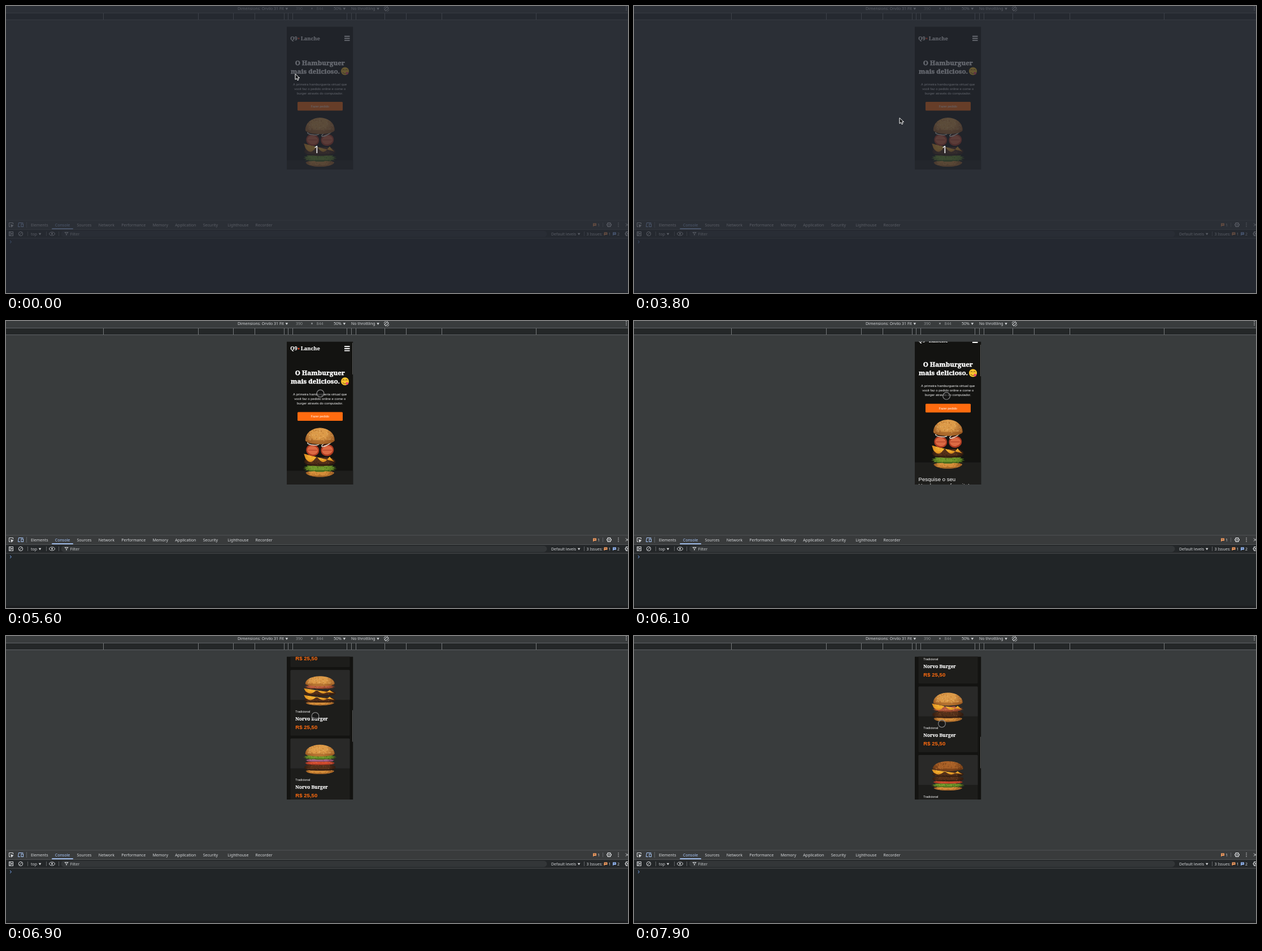
Write an HTML page with a canvas that moves like this. It is 1101 px wide and 509 px high and loops after 8000 ms.

```html
<!DOCTYPE html>
<html lang="pt">
<head>
<meta charset="utf-8">
<style>
html, body { margin: 0; width: 100%; height: 100%; overflow: hidden; background: #393c3d; }
canvas { display: block; }
</style>
</head>
<body>
<canvas id="stage" width="1101" height="509"></canvas>
<script>
const ctx = document.getElementById('stage').getContext('2d');
const LOOP = 8000, STEP = 100, COUNTDOWN_END = 4100, TOUCH_START = 5300;
const PHONE = { x: 497, y: 36.5, w: 117.5, h: 253.5, content: 1152 };
const CENTER = PHONE.x + PHONE.w / 2;
const UI = '"Noto Sans", sans-serif';
const SANS = '"Liberation Sans", Arial, sans-serif';
const SERIF = '"Noto Serif", serif';
const ORANGE = '#ff6b0f', BLUE = '#a8c7fa', GREY = '#d5d7da', LINE = '#5f6265';

// Pointer moves and the scroll offset they lead to
const START = { x: 512, y: 120.5, scroll: 0 };
const MOVES = [
  { from: 0, to: 200, x: 518, y: 125 },
  { from: 200, to: 800, x: 543, y: 97.5 },
  { from: 3100, to: 3600, x: 701, y: 175 },
  { from: 3600, to: 4000, x: 239, y: 222 },
  { from: 4000, to: 4400, x: 491.5, y: 189 },
  { from: 4400, to: 5000, x: 614.5, y: 182 },
  { from: 5200, to: 5600, x: 556.5, y: 128.5, scroll: 8.5 },
  { from: 5600, to: 6400, x: 551.5, y: 135, scroll: 30 },
  { from: 6400, to: 6900, x: 547.5, y: 142, scroll: 430 },
  { from: 7000, to: 7300, x: 546, y: 148, scroll: 537 },
  { from: 7600, to: 7900, x: 545, y: 155.5, scroll: 644 }
];

function poseAt(t) {
  let pose = START;
  for (const move of MOVES) {
    const p = Math.min(1, Math.max(0, (t - move.from) / (move.to - move.from)));
    const eased = p * p * (3 - 2 * p);
    const mix = key => pose[key] + ((move[key] ?? pose[key]) - pose[key]) * eased;
    pose = { x: mix('x'), y: mix('y'), scroll: mix('scroll') };
  }
  return pose;
}

function rect(x, y, w, h, color, radius = 0) {
  ctx.fillStyle = color;
  ctx.beginPath();
  ctx.roundRect(x, y, w, h, radius);
  ctx.fill();
}

function path(points, color, { fill = false, close = false, width = 1 } = {}) {
  ctx.beginPath();
  points.forEach(([x, y]) => ctx.lineTo(x, y));
  if (close) ctx.closePath();
  ctx.fillStyle = ctx.strokeStyle = color;
  ctx.lineWidth = width;
  fill ? ctx.fill() : ctx.stroke();
}

function ellipse(x, y, rx, ry, color, { width = 0, angle = 0, from = 0, to = Math.PI * 2 } = {}) {
  ctx.beginPath();
  ctx.ellipse(x, y, rx, ry, angle, from, to);
  ctx.fillStyle = ctx.strokeStyle = color;
  ctx.lineWidth = width;
  width ? ctx.stroke() : ctx.fill();
}

// y is the middle of the capital letters; returns the right end of left-aligned text
function text(str, x, y, size = 7, color = GREY, { family = UI, weight = 400, align = 'left', bolder = 0 } = {}) {
  ctx.font = `${weight} ${size}px ${family}`;
  ctx.textAlign = align;
  ctx.fillStyle = ctx.strokeStyle = color;
  ctx.fillText(str, x, y + size * 0.36);
  ctx.lineWidth = bolder;
  if (bolder) ctx.strokeText(str, x, y + size * 0.36);
  return x + ctx.measureText(str).width;
}

function random(seed) {
  return () => (seed = (seed * 16807) % 2147483647) / 2147483647;
}

const vline = (x, y, h, color = LINE) => rect(x, y, 1, h, color);
const dots = (x, y) => [-3, 0, 3].forEach(d => ellipse(x, y + d, 0.8, 0.8, GREY));
const dropdown = (label, x, y) => {
  const end = text(label, x, y) + 5;
  path([[end - 2.3, y - 1.2], [end + 2.3, y - 1.2], [end, y + 2.5]], GREY, { fill: true });
};

function gear(x, y) {
  ellipse(x, y, 3.3, 3.3, GREY, { width: 1.2 });
  ellipse(x, y, 1.2, 1.2, GREY);
  for (let a = 0; a < Math.PI * 2; a += Math.PI / 3) {
    const c = Math.cos(a), s = Math.sin(a);
    path([[x + c * 3, y + s * 3], [x + c * 4.5, y + s * 4.5]], GREY, { width: 1.5 });
  }
}

function badge(x, y, color, count) {
  rect(x - 3, y - 2.7, 6, 4.5, color, 0.6);
  path([[x - 3, y], [x - 3, y + 3.4], [x, y + 1]], color, { fill: true });
  rect(x - 1.5, y - 1.2, 3, 0.8, '#2a2d2f');
  text(count, x + 5, y);
}

const FOOD = {
  bun: { height: 20, width: 52, light: '#dc9a48', dark: '#91501d', speck: '#efcb8b' },
  darkBun: { height: 20, width: 54, light: '#a75f26', dark: '#542a10', speck: '#cc8640' },
  heel: { height: 9, width: 50, light: '#d48d39', dark: '#7d4317', speck: '#e0a557' },
  patty: { height: 11, width: 57, light: '#553019', dark: '#1d110c', speck: '#7d5233' },
  cheese: { height: 5, width: 57, light: '#f2ae2e', dark: '#d17c18', speck: '#ffc850' },
  lettuce: { height: 9, width: 61, light: '#6f962b', dark: '#24400f', speck: '#9cbc46' },
  tomato: { height: 6, width: 53, light: '#d24c2e', dark: '#85281a', speck: '#e98760' },
  onion: { height: 5, width: 51, light: '#a9688a', dark: '#592744', speck: '#dfc0cf' },
  bacon: { height: 9, width: 56, light: '#bd5f40', dark: '#54210f', speck: '#e2a070' },
  slices: { height: 13 },
  rings: { height: 5 }
};

function slices(cx, y, h) {
  for (const side of [-1, 1]) {
    const x = cx + side * 13, angle = -side * 0.2;
    ellipse(x, y + h / 2, 11.5, h * 0.55, '#ad3a22', { angle });
    ellipse(x, y + h / 2, 9.5, h * 0.4, '#dc6a44', { angle });
    path([[x - 8, y + h / 2], [x + 8, y + h / 2]], '#ad3a22');
  }
}

function rings(cx, y, h) {
  for (const side of [-1, 1]) {
    ellipse(cx + side * 12, y + h / 2, 10, 2.8, '#dcd7c8', { width: 1.5, angle: 0.1 - (side > 0) * 0.6 });
  }
}

function outline(kind, cx, y, w, h) {
  ctx.beginPath();
  if (/bun|heel/i.test(kind)) {
    const crown = kind === 'heel' ? 0.3 : 0.75;
    ctx.ellipse(cx, y + h * crown, w / 2, h * crown, 0, Math.PI, Math.PI * 2);
    ctx.ellipse(cx, y + h * crown, w / 2, h * (1 - crown), 0, 0, Math.PI);
  } else if (kind === 'cheese') {
    ctx.moveTo(cx - w / 2, y);
    for (let f = 1; f >= 0; f -= 0.05) {
      ctx.lineTo(cx + (f - 0.5) * w, y + h * (0.35 + 0.65 * Math.abs(Math.sin(f * Math.PI * 2.5))));
    }
  } else {
    const ruffle = /lettuce|bacon/.test(kind) ? 0.11 : 0.03;
    for (let a = 0; a < Math.PI * 2; a += 0.15) {
      const r = 1 - ruffle + ruffle * Math.sin(a * 13), c = Math.cos(a), s = Math.sin(a);
      ctx.lineTo(cx + Math.sign(c) * Math.abs(c) ** 0.6 * r * w / 2, y + h / 2 + s * r * h / 2);
    }
  }
}

function layer(kind, cx, y, h) {
  if (kind === 'slices') return slices(cx, y, h);
  if (kind === 'rings') return rings(cx, y, h);
  const { width: w, light, dark, speck } = FOOD[kind];
  const rand = random(w * 97 + kind.length);
  ctx.save();
  outline(kind, cx, y, w, h);
  const shade = ctx.createRadialGradient(cx - 3, y + h * 0.2, 2, cx, y + h * 0.3, w * 0.6);
  shade.addColorStop(0, light);
  shade.addColorStop(0.4, light);
  shade.addColorStop(1, dark);
  ctx.fillStyle = shade;
  ctx.fill();
  ctx.clip();
  ctx.globalAlpha = 0.5;
  rect(cx - w / 2, y + h * 0.75, w, h, dark);
  for (let i = 0; i < w * h / 16; i++) {
    ellipse(cx + (rand() - 0.5) * w, y + rand() * h * 0.8, 1.1, 0.6, i % 2 ? speck : dark, { angle: rand() * 3 });
  }
  ctx.restore();
}

// Stacks the ingredients, listed from the top, into the given height
function burger(recipe, cx, top, height) {
  const kinds = recipe.split(' ');
  const scale = height / kinds.reduce((sum, kind) => sum + FOOD[kind].height, 0);
  let y = top + height;
  for (const kind of kinds.reverse()) {
    const h = FOOD[kind].height * scale;
    y -= h;
    const overhang = kind === 'cheese' ? 2.4 : kind === 'heel' ? 1 : 1.2;
    layer(kind, cx, y, h * overhang);
  }
}

const HERO = 'bun rings slices cheese patty lettuce heel';
const RECIPES = [
  'bun cheese lettuce patty heel',
  'bun bacon cheese patty cheese patty heel',
  'bun lettuce onion tomato patty heel',
  'bun cheese bacon patty heel',
  'darkBun cheese patty patty tomato lettuce heel'
];

function emoji(x, y) {
  const brown = '#65471b';
  ellipse(x, y, 7, 7, '#fcc42d');
  for (const side of [-1, 1]) {
    ellipse(x + side * 2.6, y - 1.6, 1.5, 1.3, brown, { width: 1, from: Math.PI, to: Math.PI * 2 });
  }
  ellipse(x, y + 1, 4, 3.4, brown, { width: 1, from: 0.2, to: 2.9 });
  ellipse(x + 3.7, y + 3.6, 2.1, 2.5, '#ef4a68', { angle: -0.7 });
}

function card(y, recipe) {
  rect(503.5, y, 105, 116.5, '#1d1d1b', 1.5);
  rect(503.5, y, 105, 53, '#292928', [1.5, 1.5, 0, 0]);
  burger(recipe, CENTER, y + 11, 52);
  text('Tradicional', 512.3, y + 73.7, 5.4, '#fff', { family: SANS });
  text('Norvo Burger', 512.3, y + 86.5, 8.3, '#fff', { family: SERIF, weight: 700, bolder: 0.2 });
  text('R$ 25,50', 512.3, y + 101, 9.6, ORANGE, { family: SANS, weight: 700 });
}

function phone(scroll, showBar) {
  const { x, y, w, h, content } = PHONE;
  const centered = { family: SANS, align: 'center' };
  ctx.save();
  ctx.beginPath();
  ctx.rect(x, y, w, h);
  ctx.clip();
  rect(x, y, w, h, '#131311');
  ctx.translate(0, -scroll);
  rect(x, 274, w, 83, '#1e1e1c');

  const logo = { family: SERIF, weight: 700, bolder: 0.15 };
  text('Q9', 503.3, 57.5, 9.2, '#fff', logo);
  ellipse(518, 57.5, 1.6, 1.6, '#f0441e');
  text('Lanche', 521.8, 57.5, 9.2, '#fff', logo);
  for (let i = 0; i < 3; i++) rect(599, 52.8 + i * 3.7, 9.5, 1.9, '#fff');

  const title = { family: SERIF, weight: 900, align: 'center', bolder: 0.45 };
  text('O Hamburguer', CENTER, 100.5, 11.6, '#fff', title);
  text('mais delicioso.', 547.5, 115.5, 11.6, '#fff', title);
  emoji(600, 115.5);
  ['A primeira hamburgueria virtual que', 'você faz o pedido online e come o', 'burger através do computador.']
    .forEach((line, i) => text(line, CENTER, 138.5 + i * 8, 6, '#f5f5f5', centered));
  rect(516, 170, 80, 15.5, ORANGE, 1.5);
  text('Fazer pedido', CENTER, 177.8, 5.5, '#fff', centered);
  burger(HERO, CENTER, 198, 87);

  ['Pesquise o seu', 'Hamburguer favorito!']
    .forEach((line, i) => text(line, 503.5, 303.5 + i * 11.5, 9.6, '#fff', { family: SANS }));
  rect(503.5, 328, 105, 18, '#292928', 1.5);
  for (let i = 0; i < 7; i++) card(368.6 + i * 121.6, RECIPES[i % RECIPES.length]);
  ctx.restore();
  if (showBar) rect(613, y + 0.5 + scroll * h / content, 1, h * h / content, '#585858');
}

function deviceBar() {
  rect(0, 0, 1101, 380, '#393c3d');
  rect(0, 12, 1101, 13, LINE);
  rect(0, 13, 1101, 11, '#242728');
  // Ruler marks at the edges of common device widths
  for (const width of [320, 375, 425, 768, 1024, 1440, 2560]) {
    for (const side of [-1, 1]) vline(Math.round(555.3 + side * width * 0.1496), 13, 11, '#777a7c');
  }
  dropdown('Dimensions: Orvilo 31 Fit', 410, 4.5);
  text('390', 513, 4.5, 7, '#8f9294');
  text('×', 539.5, 4.5);
  text('844', 549.5, 4.5, 7, '#8f9294');
  dropdown('50%', 580, 4.5);
  dropdown('No throttling', 611, 4.5);
  ctx.save();
  ctx.translate(673.5, 5);
  ctx.rotate(Math.PI / 4);
  ctx.strokeStyle = GREY;
  ctx.lineWidth = 1;
  ctx.strokeRect(-1.7, -3.5, 3.4, 7);
  for (const from of [-0.6, Math.PI - 0.6]) ellipse(0, 0, 4.6, 4.6, GREY, { width: 0.8, from, to: from + 1.2 });
  ctx.restore();
  dots(1098, 4);
}

function box(x, y, w, h, color) {
  ctx.strokeStyle = color;
  ctx.lineWidth = 1;
  ctx.strokeRect(x, y, w, h);
}

function devTools() {
  rect(0, 380, 1101, 16, '#393b3c');
  rect(0, 396, 1101, 16, '#242729');
  rect(0, 412, 1101, 93, '#212527');
  rect(0, 505, 1101, 4, '#1b1d1f');
  for (const y of [379.5, 396, 411.5]) rect(0, y, 1101, 1, '#505355');

  path([[8, 391.5], [5.5, 391.5], [5.5, 384.5], [12.5, 384.5], [12.5, 387]], GREY);
  path([[8, 387], [13.5, 389], [9.5, 393]], GREY, { fill: true });
  path([[25, 391.5], [21.5, 391.5], [22.5, 384.5], [30.5, 384.5]], BLUE);
  box(27, 386.5, 3.5, 5, BLUE);
  vline(36, 383, 10);
  let x = 44;
  for (const name of 'Elements Console Sources Network Performance Memory Application Security Lighthouse Recorder'.split(' ')) {
    const active = name === 'Console';
    if (name === 'Lighthouse') x += 5;
    const end = text(name, x, 388, 7.05, active ? BLUE : GREY);
    if (active) rect(x - 5.5, 394.3, end - x + 11, 1.7, BLUE);
    x = end + 12.2;
  }
  badge(1042, 388, '#f29b5f', '1');
  vline(1056, 384, 8);
  gear(1067.5, 388);
  dots(1084, 388);
  for (const side of [-1, 1]) path([[1097, 388 - side * 2.5], [1102, 388 + side * 2.5]], GREY);

  box(5.5, 400.5, 7, 7, GREY);
  vline(7, 400, 8, GREY);
  path([[9, 402], [12, 404], [9, 406]], GREY, { fill: true });
  ellipse(26, 404, 3.7, 3.7, GREY, { width: 1 });
  path([[23.5, 406.5], [28.5, 401.5]], GREY);
  for (const lineX of [38, 71, 93, 1023]) vline(lineX, 400, 8);
  dropdown('top', 44, 404);
  ellipse(81.5, 404, 4.8, 3, GREY, { width: 1 });
  ellipse(81.5, 404, 1.4, 1.4, GREY);
  rect(97.5, 398.7, 860, 11, '#333638', 5.5);
  path([[104, 401.5], [110, 401.5], [107, 404.8]], GREY, { close: true });
  vline(106.5, 404, 3, GREY);
  text('Filter', 113.5, 404, 7, '#c0c3c5');
  dropdown('Default levels', 965, 404);
  text('3 Issues:', 1027.5, 404);
  badge(1061.5, 404, '#f29b5f', '1');
  badge(1077, 404, '#8fb2ee', '2');
  gear(1100, 404);
  path([[7, 416], [9.5, 418.3], [7, 420.6]], '#7cacf8');
}

function pointer(x, y, touching) {
  if (touching) {
    ellipse(x, y, 6.3, 6.3, 'rgba(20,20,20,.55)');
    ellipse(x, y, 6.3, 6.3, '#858585', { width: 1.2 });
    return;
  }
  const arrow = [[0, 0], [0, 10], [2.4, 7.9], [4, 11.3], [6, 10.4], [4.4, 7.2], [7.6, 7.1]]
    .map(([dx, dy]) => [x + dx, y + dy]);
  path(arrow, '#16181a', { fill: true });
  path(arrow, '#fff', { close: true });
}

function draw() {
  const t = Math.floor(performance.now() % LOOP / STEP) * STEP;
  const { x, y, scroll } = poseAt(t);
  const touching = t >= TOUCH_START;
  deviceBar();
  phone(scroll, touching);
  devTools();
  if (t < COUNTDOWN_END) {
    rect(0, 0, 1101, 509, 'rgba(37,42,52,.7)');
    text('1', 550, 254.5, 18, '#fff', { align: 'center' });
  }
  pointer(x, y, touching);
  requestAnimationFrame(draw);
}
draw();
</script>
</body>
</html>
```
